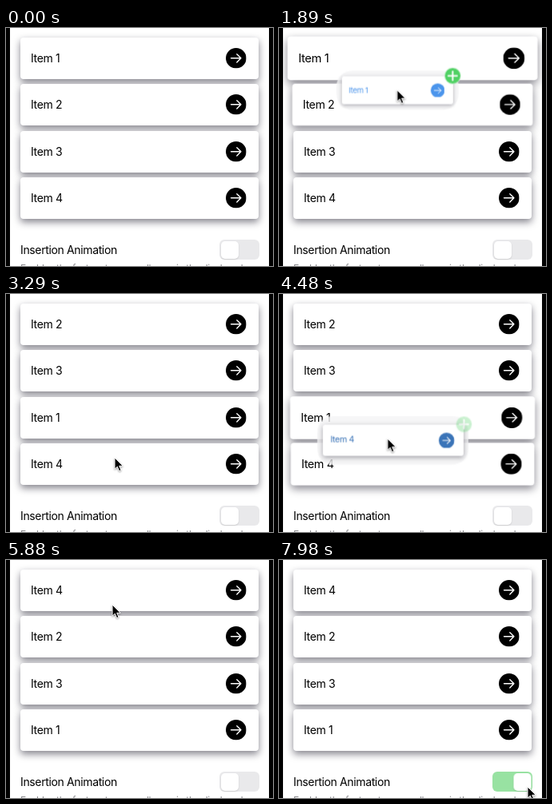
Write an HTML page that moves like this. It is 334 by 298 pixels and loops after 8000 ms.

```html
<!DOCTYPE html>
<html lang="en">
<head>
<meta charset="utf-8">
<title>Drag to reorder</title>
<style>
html, body { margin: 0; width: 100%; height: 100%; overflow: hidden; background: #000; }
.stage {
  position: relative; width: 334px; height: 298px; overflow: hidden;
  background: linear-gradient(90deg, #000 5px, #fff 5px 329px, #000 329px);
  font: 14px/1 Inter, "Liberation Sans", sans-serif; letter-spacing: -.026em; color: #000;
}
.stage * { box-sizing: border-box; animation-duration: 8s; animation-iteration-count: infinite; animation-timing-function: linear; }
.card {
  position: absolute; width: 298px; height: 3.73em; padding: 0 1.08em 0 .93em;
  display: flex; align-items: center; justify-content: space-between;
  background: #fff; border-radius: .28em; box-shadow: 0 .29em .72em rgba(12, 10, 28, .5);
  white-space: nowrap;
}
.card svg { width: 1.83em; height: 1.83em; flex: none; }
.labels { display: grid; }
.labels span { grid-area: 1 / 1; animation-timing-function: step-end; }
.labels :nth-child(1) { animation-name: first; }
.labels :nth-child(2) { animation-name: second; }
.labels :nth-child(3) { animation-name: third; }
.row { left: 18.3px; }
.row1 { top: 11.9px; animation-name: row1; }
.row2 { top: 70.2px; animation-name: row2; }
.row3 { top: 128.5px; animation-name: row3; }
.row4 { top: 186.8px; animation-name: row4; }

.title, .caption { position: absolute; left: 18px; white-space: nowrap; }
.title { top: 270.5px; }
.caption { top: 295px; font-size: 12px; color: #8a8a8e; }
.switch {
  position: absolute; left: 267px; top: 265px; width: 49.5px; height: 25px;
  border-radius: 6px; background: #e9e9eb; animation-name: track;
}
.knob {
  position: absolute; left: 1.5px; top: 1.5px; width: 22px; height: 22px;
  border-radius: 5px; background: #fff; box-shadow: 0 1px 2px #0002; animation-name: knob;
}

.pointer { position: absolute; left: .5px; top: .5px; animation-name: pointer; }
.arrow { position: absolute; left: -1px; top: -1px; width: 14px; height: 20px; overflow: visible; filter: drop-shadow(0 1px 1px #0006); }
.drag { position: absolute; width: 298px; height: 3.73em; opacity: 0; animation-name: drag; }
.drag .card { inset: 0; width: auto; animation-name: cardShadow; animation-delay: inherit; }
.drag1 { --from: translate(20.5px, -12.5px); }
.drag2 { --from: translate(32px, 9px); animation-delay: 2.73s; }
.halo { position: absolute; inset: -7px; border-radius: 20px; background: rgba(244, 244, 245, .8); animation-name: halo; animation-delay: inherit; }
.badge { position: absolute; right: -10.5px; top: -10.5px; width: 21px; height: 21px; opacity: 0; animation-name: badge; animation-delay: inherit; }

@keyframes first { 0% { opacity: 1 } 36.6%, 100% { opacity: 0 } }
@keyframes second { 0% { opacity: 0 } 36.6% { opacity: 1 } 71%, 100% { opacity: 0 } }
@keyframes third { 0% { opacity: 0 } 71%, 100% { opacity: 1 } }

@keyframes row1 {
  0%, 20.6%, 26%, 64.6%, 73.5%, 100% { transform: none }
  22.5%, 24%, 67.1%, 70.9% { transform: scale(1.05) }
}
@keyframes row2 {
  0%, 23.2%, 29.2%, 57%, 67.1%, 100% { transform: none }
  25.6%, 27%, 59.5%, 64.6% { transform: scale(1.05) }
}
@keyframes row3 {
  0%, 27%, 39.4%, 54.9%, 58.6%, 100% { transform: none }
  29.2%, 36.5%, 56.9% { transform: scale(1.05) }
}
@keyframes row4 {
  0%, 53%, 56.9%, 100% { transform: none }
  54.5%, 54.9% { transform: scale(1.05) }
}

@keyframes pointer {
  0%, .86% { opacity: 0; transform: translate(280px, 252px) }
  .87% { opacity: 1; transform: translate(280px, 252px); animation-timing-function: ease-out }
  9.625% { transform: translate(146px, 50px) }
  20% { transform: translate(146px, 50px); animation-timing-function: ease-in }
  24.5% { transform: translate(147px, 88px) }
  29.75% { transform: translate(146px, 148px); animation-timing-function: ease-out }
  35%, 36.9% { transform: translate(146px, 157px) }
  39.4% { transform: translate(135px, 203px) }
  41.1% { transform: translate(135px, 204px) }
  54.1% { transform: translate(135px, 204px); animation-timing-function: ease-in }
  58.6% { transform: translate(134px, 104px); animation-timing-function: ease-out }
  65.6% { transform: translate(132px, 63px); animation-timing-function: ease-out }
  69.1% { transform: translate(132px, 55px) }
  79.6% { transform: translate(132px, 55px); animation-timing-function: ease-in-out }
  89.25%, 90.1% { transform: translate(230px, 249px); animation-timing-function: ease-out }
  94.5%, 100% { opacity: 1; transform: translate(310px, 283px) }
}

@keyframes drag {
  0%, 14.87% { opacity: 0 }
  0%, 14.88% { width: 298px; font-size: 14px; color: #000; transform: translate(-50%, -50%) var(--from) }
  14.88% { opacity: 1 }
  17.5% { width: 303px; font-size: 14.25px; color: #000; transform: translate(-50%, -50%) var(--from) }
  20% { width: 310px; font-size: 14.5px; color: #000; transform: translate(-50%, -50%) var(--from); animation-timing-function: ease-in-out }
  22.8%, 100% { width: 139px; font-size: 9.6px; color: #4b95ec; transform: translate(-50%, -50%) translate(.5px, .5px) }
  36.5% { opacity: 1 }
  37.5%, 100% { opacity: 0 }
}
@keyframes cardShadow {
  0%, 20% { box-shadow: 0 .29em .72em rgba(12, 10, 28, .5) }
  22.8%, 100% { box-shadow: 0 .15em .5em rgba(12, 10, 28, .32) }
}
@keyframes halo {
  0%, 14.88% { inset: 0; opacity: 0 }
  17.5%, 20% { inset: -18px -4px; opacity: 1 }
  22.8%, 100% { inset: -7px; opacity: 1 }
}
@keyframes badge {
  0%, 21.5% { opacity: 0 }
  22.8%, 100% { opacity: 1 }
}
@keyframes track { 0%, 97.4% { background: #e9e9eb } 99.7%, 100% { background: #98e2a2 } }
@keyframes knob { 0%, 97.4% { transform: none } 99.7%, 100% { transform: translateX(24.5px) } }
</style>
</head>
<body>
<svg width="0" height="0" style="position:absolute">
  <symbol id="go" viewBox="0 0 26 26">
    <circle cx="13" cy="13" r="13" fill="currentColor"/>
    <path d="M6.6 13H19.2M14 7.8l5.2 5.2-5.2 5.2" fill="none" stroke="#fff" stroke-width="1.4" stroke-linecap="round" stroke-linejoin="round"/>
  </symbol>
  <symbol id="plus" viewBox="0 0 21 21">
    <circle cx="10.5" cy="10.5" r="10" fill="#4fd163" stroke="#c9efcf"/>
    <path d="M5 10.5h11M10.5 5v11" stroke="#fff" stroke-width="2" stroke-linecap="round"/>
  </symbol>
</svg>
<div class="stage">
  <div class="card row row1"><div class="labels"><span>Item 1</span><span>Item 2</span><span>Item 4</span></div><svg><use href="#go"/></svg></div>
  <div class="card row row2"><div class="labels"><span>Item 2</span><span>Item 3</span><span>Item 2</span></div><svg><use href="#go"/></svg></div>
  <div class="card row row3"><div class="labels"><span>Item 3</span><span>Item 1</span><span>Item 3</span></div><svg><use href="#go"/></svg></div>
  <div class="card row row4"><div class="labels"><span>Item 4</span><span>Item 4</span><span>Item 1</span></div><svg><use href="#go"/></svg></div>

  <div class="title">Insertion Animation</div>
  <div class="switch"><div class="knob"></div></div>
  <div class="caption">Enables the feature to move all rows in the displayed</div>

  <div class="pointer">
    <div class="drag drag1">
      <div class="halo"></div>
      <div class="card">Item 1<svg><use href="#go"/></svg></div>
      <svg class="badge"><use href="#plus"/></svg>
    </div>
    <div class="drag drag2">
      <div class="halo"></div>
      <div class="card">Item 4<svg><use href="#go"/></svg></div>
      <svg class="badge"><use href="#plus"/></svg>
    </div>
    <svg class="arrow" viewBox="-1 -1 14 20">
      <path d="M0 0V14.2L3.3 11.2 5.6 16.6 8 15.6 5.7 10.3H10.2Z" fill="#000" stroke="#fff"/>
    </svg>
  </div>
</div>
</body>
</html>
```
